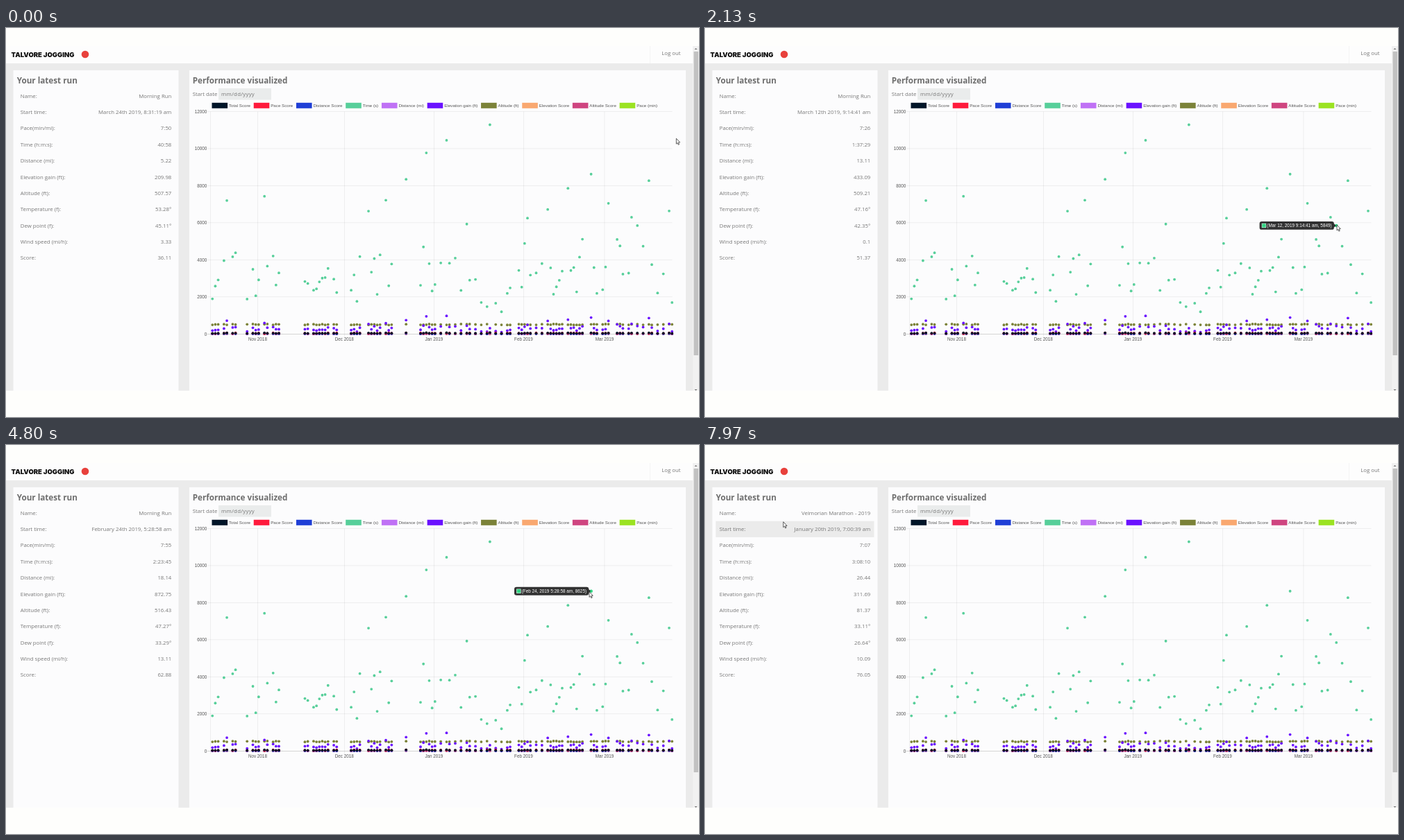
These frames come from a looping animation (998x561 px, 8 s). An HTML page with a canvas:

```html
<!DOCTYPE html>
<html lang="en">
<head>
<meta charset="utf-8">
<title>Running dashboard</title>
<style>
  html, body { margin: 0; width: 100%; height: 100%; overflow: hidden; background: #fefefc; }
  canvas { display: block; }
</style>
</head>
<body>
<canvas id="stage" width="998" height="561"></canvas>
<script>
const W = 998, H = 561, LOOP = 8000;
const SANS = '"Open Sans", "Noto Sans", sans-serif';
const ARIAL = '"Liberation Sans", Arial, sans-serif';
const ctx = document.getElementById('stage').getContext('2d');

const ROW_TOP = 86.3, ROW_H = 23.37;
const SCALE = 0.533;      // page zoom, applied to the chart's own pixel sizes
const MORNING = 0.35;     // usual start, as a part of the day

const series = [
  ['Total Score', '#001528'], ['Pace Score', '#ff1a3c'], ['Distance Score', '#1f3fd6'], ['Time (s)', '#57cf9a'],
  ['Distance (mi)', '#c071f5'], ['Elevation gain (ft)', '#6a11ff'], ['Altitude (ft)', '#7b8238'],
  ['Elevation Score', '#f9a870'], ['Altitude Score', '#cf4580'], ['Pace (min)', '#9be321']
];

// Training blocks in days since 1 November, with the weekdays off
const blocks = [
  [-17, -8, 'Fri Mon'], [-4, 7, 'Fri Mon'], [16, 27, 'Mon'], [32, 35, ''], [38, 46, 'Fri'], [51, 51, ''],
  [56, 61, ''], [63, 87, 'Mon Wed Fri'], [90, 94, ''], [96, 100, 'Wed Fri'], [101, 112, 'Fri'],
  [115, 121, 'Wed'], [124, 129, 'Fri'], [131, 143, 'Mon Wed Fri']
];
const weekdays = ['Thu', 'Fri', 'Sat', 'Sun', 'Mon', 'Tue', 'Wed'];

// Seconds of the notable runs by day; the others are seeded
const keyRuns = {
  '-11': 7200, 2: 7430, 38: 6630, 44: 7220, 51: 8345, 58: 9770, 65: 10450, 72: 5930, 80: 11290, 93: 6250,
  100: 6720, 107: 7860, 115: 8625, 121: 7050, 129: 6300, 131: 5849, 135: 8270, 142: 6640
};

const labels = ['Name:', 'Start time:', 'Pace(min/mi):', 'Time (h:m:s):', 'Distance (mi):', 'Elevation gain (ft):',
  'Altitude (ft):', 'Temperature (f):', 'Dew point (f):', 'Wind speed (mi/h):', 'Score:'];

const panels = [
  { from: 0, rows: ['Morning Run', 'March 24th 2019, 8:31:19 am', '7:50', '40:58', '5.22', '209.98',
    '507.57', '53.28°', '45.11°', '3.33', '36.11'] },
  { from: 1800, rows: ['Morning Run', 'March 12th 2019, 9:14:41 am', '7:26', '1:37:29', '13.11', '433.09',
    '509.21', '47.16°', '42.35°', '0.1', '51.37'] },
  { from: 4300, rows: ['Morning Run', 'February 24th 2019, 5:28:58 am', '7:55', '2:23:45', '18.14', '872.75',
    '516.43', '47.27°', '33.29°', '13.11', '62.88'] },
  { from: 6400, rows: ['Velmorian Marathon - 2019', 'January 20th 2019, 7:00:39 am', '7:07', '3:08:10', '26.44', '311.69',
    '81.37', '33.11°', '26.64°', '10.09', '76.05'] }
];

const tips = [
  { on: 1400, off: 2560, day: 131, stamp: 'Mar 12, 2019 9:14:41 am' },
  { on: 3640, off: 4880, day: 115, stamp: 'Feb 24, 2019 5:28:58 am' },
  { on: 5920, off: 7180, day: 80, stamp: 'Jan 20, 2019 7:00:39 am' }
];

const stops = [
  { arrive: 0, leave: 120, x: 965, y: 159 },
  { arrive: 1000, leave: 1150, x: 912, y: 287 },
  { arrive: 1420, leave: 2520, x: 909.7, y: 283.7 },
  { arrive: 3560, leave: 3680, x: 842, y: 211 },
  { arrive: 3900, leave: 4840, x: 839.7, y: 211.3 },
  { arrive: 5900, leave: 7150, x: 694, y: 143 },
  { arrive: 7930, leave: LOOP, x: 112.5, y: 110.5 }
];

const clamp = v => Math.max(0, Math.min(1, v));
const ease = v => v * v * (3 - 2 * v);
const noise = n => { const v = Math.sin(n * 127.1 + 31.7) * 43758.5453; return v - Math.floor(v); };
const xOf = day => 362.4 + day * 4.163;
const yOf = v => 441.3 - v * 320.8 / 12000;
const dip = (day, mid, width) => Math.exp(-(((day - mid) / width) ** 2));

function rect(c, x, y, w, h, fill) {
  c.fillStyle = fill;
  c.fillRect(x, y, w, h);
}

function dot(c, x, y, r, fill) {
  c.fillStyle = fill;
  c.beginPath();
  c.arc(x, y, r, 0, 7);
  c.fill();
}

function label(c, str, x, y, font, fill, align = 'left') {
  c.font = font;
  c.fillStyle = fill;
  c.textAlign = align;
  c.fillText(str, x, y);
}

function triangle(c, x, y, dy) {
  c.fillStyle = '#777';
  c.beginPath();
  c.moveTo(x - 2, y);
  c.lineTo(x + 2, y);
  c.lineTo(x, y + dy);
  c.fill();
}

function drawPage(c) {
  rect(c, 0, 0, W, H, '#fefefc');
  rect(c, 0, 26, 989, 25, '#fdfdfd');
  rect(c, 0, 51, 989, 472, '#ebebeb');
  rect(c, 927, 26, 1, 25, '#f5f5f5');
  rect(c, 10.5, 61, 238, 462, '#fcfcfd');
  rect(c, 264, 61, 715, 462, '#fcfcfd');

  rect(c, 989, 26, 9, 497, '#f1f1f1');
  rect(c, 990.5, 34, 6.5, 438, '#c1c1c1');
  triangle(c, 993.5, 31, -2);
  triangle(c, 993.5, 521, 2);

  label(c, 'TALVORE JOGGING', 7.5, 42, '900 9.5px Inter, sans-serif', '#111');
  dot(c, 114, 38, 5.3, '#e8413c');
  label(c, 'Log out', 971.5, 39.3, `7.8px ${SANS}`, '#777', 'right');

  const title = `bold 11.7px ${SANS}`;
  label(c, 'Your latest run', 15.7, 80.2, title, '#6e6e6e');
  label(c, 'Performance visualized', 268.7, 80.2, title, '#6e6e6e');
  label(c, 'Start date', 268.7, 98.2, `7.8px ${SANS}`, '#777');
  rect(c, 306, 87, 76, 16.5, '#eaecec');
  c.letterSpacing = '0.25px';
  label(c, 'mm/dd/yyyy', 310, 98.2, `7.8px ${SANS}`, '#777');
  c.letterSpacing = '0px';
}

function drawAxes(c) {
  const grid = 'rgba(0,0,0,0.11)', small = `6.3px ${ARIAL}`;
  let x = 296.5;
  for (const [name, color] of series) {
    rect(c, x, 107.8, 22.6, 8, color);
    label(c, name, x + 24.5, 114, `6.2px ${ARIAL}`, '#555');
    x += c.measureText(name).width + 29.27;
  }
  for (let v = 0; v <= 12000; v += 2000) {
    const y = yOf(v);
    rect(c, 289.5, y - SCALE / 2, 670, SCALE, v ? grid : 'rgba(0,0,0,0.3)');
    label(c, v, 289.3, y + 2.2, small, '#555', 'right');
  }
  rect(c, 294, 120.5, SCALE, 325, grid);
  Object.entries({ 'Nov 2018': 0, 'Dec 2018': 30, 'Jan 2019': 61, 'Feb 2019': 92, 'Mar 2019': 120 }).forEach(([name, day]) => {
    rect(c, xOf(day) - SCALE / 2, 120.5, SCALE, 325, grid);
    label(c, name, xOf(day), 451.4, small, '#555', 'center');
  });
}

// Ordinary runs gather near an hour, shorter after the autumn break and around the race
function runTime(day) {
  const usual = 3500 + 1900 * (noise(day) + noise(day + 300) - 1);
  return keyRuns[day] || usual * (1 - 0.45 * dip(day, 18, 3) - 0.55 * dip(day, 80, 6));
}

// Values of one run, in the order of the series
function runValues(day) {
  const secs = runTime(day);
  const race = secs > 11000;
  const climb = race ? 312 : secs * (0.072 + 0.034 * noise(day + 600));
  const altitude = race ? 81 : 485 + 55 * noise(day + 200);
  const miles = secs / 460;
  return [26 + secs * 0.0044, 20 + 45 * noise(day + 400), miles * 2, secs, miles, climb, altitude,
    climb * 0.06, altitude * 0.03, 7.5];
}

function runDays() {
  const days = [];
  for (const [from, to, off] of blocks)
    for (let d = from; d <= to; d++)
      if (!off.includes(weekdays[(d + 21) % 7])) days.push(d);
  return days;
}

function drawRuns(c) {
  const runs = runDays().map(day => [xOf(day + MORNING), runValues(day)]);
  for (let s = series.length - 1; s >= 0; s--)
    for (const [x, values] of runs) dot(c, x, yOf(values[s]), 1.9, series[s][1]);
}

function drawPanel(t, mx, my) {
  const { rows } = panels.filter(p => t >= p.from).pop();
  const hover = mx > 15.5 && mx < 243.5 ? Math.floor((my - ROW_TOP) / ROW_H) : -1;
  rows.forEach((value, i) => {
    const y = ROW_TOP + i * ROW_H;
    if (i === hover) rect(ctx, 15.5, y, 228, ROW_H, '#ebebeb');
    label(ctx, labels[i], 20.8, y + 14.4, `7.8px ${SANS}`, '#777');
    label(ctx, value, 238.3, y + 14.4, `7.8px ${SANS}`, '#777', 'right');
  });
}

function drawTip({ on, off, day, stamp }, t) {
  const alpha = Math.min(clamp((t - on) / 250), 1 - clamp((t - off) / 200));
  if (alpha <= 0) return;
  const x = xOf(day + MORNING), y = yOf(keyRuns[day]);
  const text = `(${stamp}, ${keyRuns[day]})`;
  if (t < off) dot(ctx, x, y, 2.3, '#32d583');
  ctx.globalAlpha = alpha;
  ctx.font = `6.4px ${ARIAL}`;
  const w = ctx.measureText(text).width + 26 * SCALE;
  const right = x - 7 * SCALE + 0.4, left = right - w;
  const half = 5.9, caret = 5 * SCALE;
  ctx.fillStyle = 'rgba(0,0,0,0.8)';
  ctx.beginPath();
  ctx.roundRect(left, y - half, w, half * 2, 6 * SCALE);
  ctx.moveTo(right, y - caret);
  ctx.lineTo(right + caret, y);
  ctx.lineTo(right, y + caret);
  ctx.fill();
  rect(ctx, left + 3.2, y - 3.2, 6.4, 6.4, '#fff');
  rect(ctx, left + 3.7, y - 2.7, 5.4, 5.4, '#32d583');
  label(ctx, text, left + 20 * SCALE, y + 2, ctx.font, '#fff');
  ctx.globalAlpha = 1;
}

function cursorAt(t) {
  const i = stops.findIndex(s => t < s.leave);
  const to = stops[i], from = stops[i - 1] || to;
  const k = t >= to.arrive ? 1 : ease((t - from.leave) / (to.arrive - from.leave));
  return [from.x + (to.x - from.x) * k, from.y + (to.y - from.y) * k];
}

function drawCursor(x, y) {
  ctx.save();
  ctx.translate(x, y);
  const arrow = new Path2D('M.3 .3V8.2L2 6.6 3.2 9.4 4.5 8.8 3.3 6.1 5.6 6Z');
  ctx.fillStyle = '#fff';
  ctx.fill(arrow);
  ctx.strokeStyle = '#333';
  ctx.lineWidth = 0.8;
  ctx.stroke(arrow);
  ctx.restore();
}

const still = document.createElement('canvas');
still.width = W;
still.height = H;
const base = still.getContext('2d');
drawPage(base);
drawAxes(base);
drawRuns(base);

function frame() {
  const t = performance.now() % LOOP;
  const [mx, my] = cursorAt(t);
  ctx.drawImage(still, 0, 0);
  drawPanel(t, mx, my);
  tips.forEach(tip => drawTip(tip, t));
  drawCursor(mx, my);
  requestAnimationFrame(frame);
}
frame();
</script>
</body>
</html>
```
